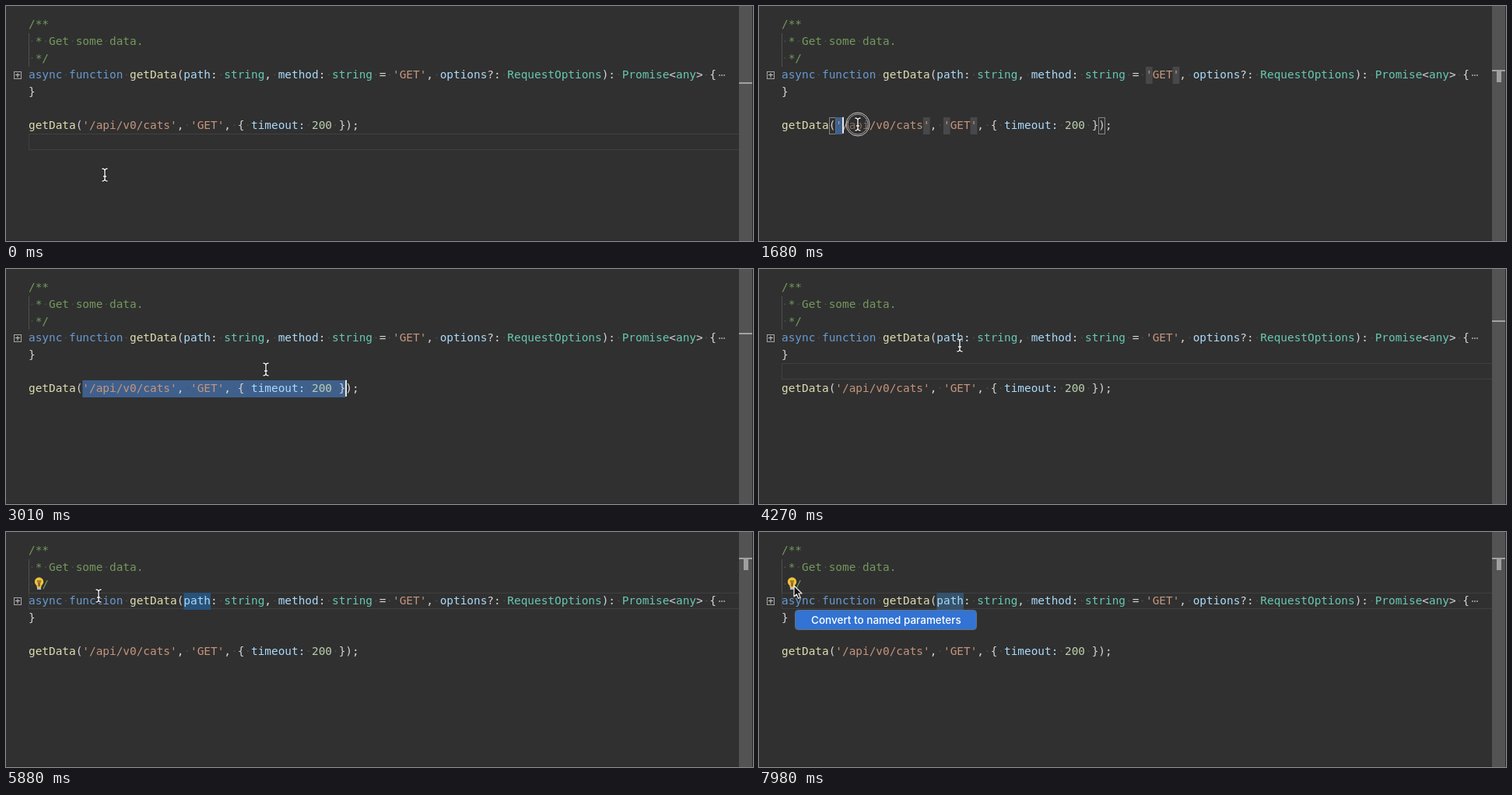
Recreate the animation shown at these times as an HTML page with a canvas. Size 960x302 px, loop 8000 ms.

```html
<!DOCTYPE html>
<html lang="en">
<head>
<meta charset="utf-8">
<title>Editor refactoring</title>
<style>
  html, body { margin: 0; width: 100%; height: 100%; overflow: hidden; background: #303030; }
  canvas { display: block; }
</style>
</head>
<body>
<canvas id="stage" width="960" height="302"></canvas>
<script>
const ctx = document.getElementById('stage').getContext('2d');
const LOOP = 8000, STEP = 70;
const LEFT = 29, COL = 8.667, ROW = 21.6, FIRST_TOP = 13.2;

const COLORS = {
  comment: '#74985d', keyword: '#679ad1', fn: '#dcdcaf', param: '#aadafa',
  type: '#67c8b1', string: '#c5947c', number: '#bacdab', plain: '#d4d4d4'
};

// Each line is a list of [style, text] runs.
const LINES = [
  [['comment', '/**']],
  [['comment', ' * Get some data.']],
  [['comment', ' */']],
  [['keyword', 'async function '], ['fn', 'getData'], ['plain', '('],
   ['param', 'path'], ['plain', ': '], ['type', 'string'], ['plain', ', '],
   ['param', 'method'], ['plain', ': '], ['type', 'string'], ['plain', ' = '],
   ['string', "'GET'"], ['plain', ', '], ['param', 'options'], ['plain', '?: '],
   ['type', 'RequestOptions'], ['plain', '): '], ['type', 'Promise'], ['plain', '<'],
   ['type', 'any'], ['plain', '> {']],
  [['plain', '}']],
  [],
  [['fn', 'getData'], ['plain', '('], ['string', "'/api/v0/cats'"], ['plain', ', '],
   ['string', "'GET'"], ['plain', ', { '], ['param', 'timeout:'], ['plain', ' '],
   ['number', '200'], ['plain', ' });']]
];

// Pointer path: time, x, y
const PATH = [
  [0, 127, 217], [280, 127, 217], [840, 112, 191], [1000, 110, 190], [1340, 98, 153],
  [1540, 98, 153], [1600, 108, 152], [1680, 127, 152], [2350, 437, 152], [2660, 437, 152],
  [3010, 334, 129], [3400, 292, 131], [3780, 288, 131], [4270, 258, 98], [4600, 254, 91],
  [5400, 254, 91], [6200, 46, 77], [6580, 45, 76], [8000, 45, 76]
];
const PRESSES = [[1400, 2640], [3570, 3710], [4860, 4985], [5050, 5160], [6900, 7080]];
const DRAG_START = 1400, DRAG_END = 2640, CLEAR = 3600, CLICK = 4880,
      SELECT = 5060, BULB = 5460, HAND = 6050, MENU = 7210;

const colX = c => LEFT + c * COL;
const rowY = line => FIRST_TOP + (line - 1) * ROW;
const smooth = u => u * u * (3 - 2 * u);

function pointerAt(t) {
  const i = Math.max(1, PATH.findIndex(p => p[0] >= t));
  const [t0, x0, y0] = PATH[i - 1], [t1, x1, y1] = PATH[i];
  const u = (t - t0) / (t1 - t0), k = t > 1500 && t < 1700 ? u : smooth(u);
  return [x0 + (x1 - x0) * k, y0 + (y1 - y0) * k];
}

function fill(color, x, y, w, h) {
  ctx.fillStyle = color;
  ctx.fillRect(x, y, w, h);
}

function frame(color, x, y, w, h) {
  ctx.strokeStyle = color;
  ctx.lineWidth = 1;
  ctx.strokeRect(Math.round(x) + .5, Math.round(y) + .5, w, h);
}

function mark(color, line, from, to) {
  fill(color, colX(from), Math.round(rowY(line)), (to - from) * COL, 22);
}

function circle(x, y, r) {
  ctx.beginPath();
  ctx.arc(x, y, r, 0, 7);
}

// Caret line, column, selection start and time since the last caret move.
function editorState(t) {
  if (t < DRAG_START) return { line: 8, col: 0, since: t + 650 };
  if (t < CLEAR) {
    const dragging = t < DRAG_END;
    const x = dragging ? pointerAt(t - 100)[0] : 437;
    const col = Math.max(8, Math.min(47, Math.round((x - LEFT) / COL)));
    return { line: 7, col, start: 8, since: dragging ? 0 : t - DRAG_END };
  }
  if (t < CLICK) return { line: 6, col: 0, since: t - CLEAR };
  if (t < SELECT) return { line: 4, col: 26, since: t - CLICK };
  return { line: 4, col: 27, start: 23, since: t - SELECT };
}

function drawHighlights(t, s) {
  const selected = s.start !== undefined && s.col > s.start;
  if (!selected && s.line !== 7) {
    frame('#404040', LEFT, rowY(s.line), 913, 20);
  }
  if (s.line === 4 && selected) {
    ctx.strokeStyle = '#404040';
    frame('#404040', LEFT, rowY(4), 913, 20);
    mark(t < MENU ? '#28527a' : '#35536c', 4, s.start, s.col);
  }
  if (s.line !== 7) return;
  if (s.col <= 9) {
    frame('#858585', colX(7), rowY(7), 8, 21);
    frame('#858585', colX(47), rowY(7), 8, 21);
  }
  if (s.col === 9) {
    [[4, 54], [4, 58], [7, 21], [7, 24], [7, 28]].forEach(([line, c]) => mark('#48484a', line, c, c + 1));
  }
  if (selected) mark('#3f608c', 7, s.start, s.col);
}

function drawCode() {
  fill('#505050', LEFT, 35, 1, 43);
  ctx.font = '14.4px "DejaVu Sans Mono", monospace';
  ctx.textBaseline = 'alphabetic';
  LINES.forEach((runs, i) => {
    let col = 0;
    const base = rowY(i + 1) + 15.2;
    for (const [style, text] of runs) {
      for (const ch of text) {
        if (ch === ' ') {
          fill('#505350', colX(col) + 3.7, base - 5.5, 1.5, 1.5);
        } else {
          ctx.fillStyle = COLORS[style];
          ctx.fillText(ch, colX(col), base);
        }
        col++;
      }
    }
  });
  for (let i = 0; i < 3; i++) fill('#8a8a8a', 916 + i * 3, 88, 2, 2);
  frame('#a5a5a5', 10, 84, 9, 9);
  fill('#c5c5c5', 12, 88, 6, 1);
  fill('#c5c5c5', 14.5, 86, 1, 6);
}

function drawScrollbar(s) {
  fill('#535353', 942, 0, 17, 302);
  fill('#2a2a2a', 959, 0, 1, 302);
  fill('#282828', 0, 301, 942, 1);
  const y = Math.round(33 + (s.line - 4) * 16.33);
  fill('#a2a2a2', 942, y, 17, 2);
  if (s.col === 9 || s.start === 23) fill('#a0a0a0', 948, y, 6, 16);
}

function drawBulb() {
  fill('#303030', 37.5, 57, 10, 20);
  ctx.fillStyle = '#f0c13b';
  circle(42.5, 64, 5.7);
  ctx.fill();
  fill('#f0c13b', 39.5, 67, 6, 4);
  fill('#b8b8b8', 40, 71, 5, 3);
  ctx.strokeStyle = '#4a3c18';
  ctx.lineWidth = 1;
  ctx.stroke(new Path2D('M40 63h5M41 64l1 2v4M44 64l-1 2v4'));
}

function drawMenu() {
  ctx.beginPath();
  ctx.roundRect(46.5, 100.5, 233, 25, 4);
  ctx.fillStyle = '#3273d3';
  ctx.fill();
  ctx.strokeStyle = '#69727f';
  ctx.lineWidth = 1;
  ctx.stroke();
  ctx.fillStyle = '#fff';
  ctx.font = '500 13.5px Inter, sans-serif';
  ctx.fillText('Convert to named parameters', 67, 118);
}

const IBEAM = new Path2D('M-3.5 -8 Q0 -8 0 -5 Q0 -8 3.5 -8 M0 -6 V6 M-3.5 8 Q0 8 0 5 Q0 8 3.5 8 M-2 2 H2');
const ARROW = new Path2D('M0 0 V14 L3.3 11 L5.7 16.3 L8.2 15.2 L5.8 10 H10 Z');
const POINTING = new Path2D('M-3 -6 Q-1.5 -8 0 -6 L2 -1 Q4 -2 5 0 Q7 -1 8 1 Q9.5 1 9.5 3 L8.5 8 H1 L-4 3 Q-4.5 1 -1.5 2 Z');

function drawPointer(t) {
  const [x, y] = pointerAt(t);
  if (PRESSES.some(([a, b]) => t >= a && t < b)) {
    circle(x, y, 15);
    ctx.fillStyle = 'rgba(48,48,48,.4)';
    ctx.fill();
    ctx.lineWidth = 1;
    ctx.strokeStyle = '#c8c8c8';
    ctx.stroke();
    circle(x, y, 13);
    ctx.strokeStyle = '#a0a0a0';
    ctx.stroke();
  }
  ctx.save();
  ctx.lineJoin = 'round';
  if (t < HAND) {
    ctx.translate(Math.round(x), Math.round(y));
    ctx.strokeStyle = '#181818';
    ctx.lineWidth = 3;
    ctx.stroke(IBEAM);
    ctx.strokeStyle = '#f2f2f2';
    ctx.lineWidth = 1.4;
    ctx.stroke(IBEAM);
  } else {
    const menu = t >= MENU;
    const shape = menu ? ARROW : POINTING;
    ctx.translate(x, menu ? y - 7 : y);
    ctx.fillStyle = menu ? '#111' : '#f5f5f5';
    ctx.strokeStyle = menu ? '#f0f0f0' : '#222';
    ctx.lineWidth = 1.2;
    ctx.fill(shape);
    ctx.stroke(shape);
  }
  ctx.restore();
}

function draw(now) {
  const t = Math.floor(now % LOOP / STEP) * STEP;
  const s = editorState(t);
  fill('#303030', 0, 0, 960, 302);
  drawHighlights(t, s);
  drawCode();
  drawScrollbar(s);
  if (s.since % 1000 < 500 && t < 7060) fill('#e8e8e8', Math.round(colX(s.col)), rowY(s.line), 2, 21);
  if (t >= BULB) drawBulb();
  if (t >= MENU) drawMenu();
  drawPointer(t);
  requestAnimationFrame(draw);
}
requestAnimationFrame(draw);
</script>
</body>
</html>
```
